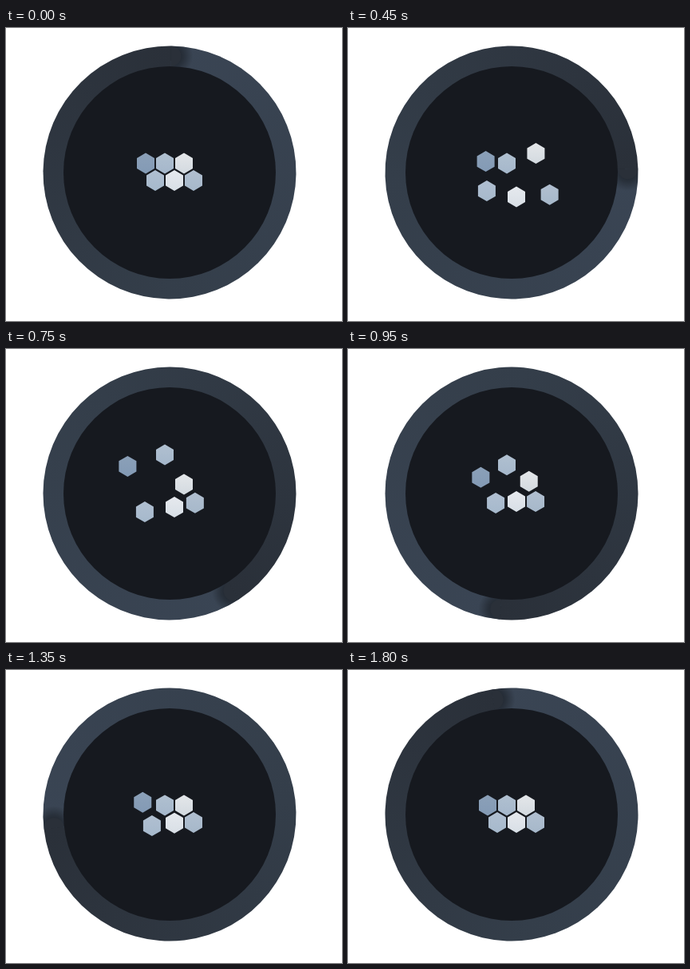
An HTML page with a canvas that plays this animation: 421 px wide and 367 px high, repeating every 1850 ms.

```html
<!DOCTYPE html>
<html lang="en">
<head>
<meta charset="utf-8">
<title>Hexagon loader</title>
<style>
html, body { margin: 0; width: 100%; height: 100%; overflow: hidden; background: #fff; }
canvas { display: block; }
</style>
</head>
<body>
<canvas id="stage" width="421" height="367"></canvas>
<script>
const ctx = document.getElementById('stage').getContext('2d');
const TAU = Math.PI * 2;
const LOOP = 1850, STEP = 50;
const CX = 205, CY = 181, OUTER = 158.5, INNER = 133;
const MID = (OUTER + INNER) / 2, HALF = (OUTER - INNER) / 2;
const DARK = '#2a3039';

// home, direction, reach, start delay, top and bottom colour
const hexes = [
  { x: 223, y: 169.5, dx: 1, dy: -1, reach: 19, delay: 0, top: '#e4e6e9', bottom: '#d3dae0' },
  { x: 235, y: 191, dx: 1, dy: 1, reach: 19.5, delay: 100, top: '#b1bfd0', bottom: '#a6b8ca' },
  { x: 211, y: 191, dx: 0, dy: 1, reach: 20.5, delay: 200, top: '#e6e9ee', bottom: '#d8dfe6' },
  { x: 187, y: 191, dx: -1, dy: 1, reach: 20, delay: 300, top: '#b0bfd1', bottom: '#a6b9cc' },
  { x: 175, y: 169.5, dx: -1, dy: -1, reach: 25, delay: 400, top: '#8ba0b8', bottom: '#839ab5' },
  { x: 199, y: 169.5, dx: 0, dy: -1, reach: 37, delay: 500, top: '#b0c0d0', bottom: '#a5b7cb' }
];

const clamp = v => Math.min(1, Math.max(0, v));
const ease = v => (1 - Math.cos(Math.PI * clamp(v))) / 2;

// A smooth hump: up from a to b, down from b to c
const hump = (t, a, b, c) => t < b ? ease((t - a) / (b - a)) : 1 - ease((t - b) / (c - b));

function offset(hex, t) {
  const local = t - hex.delay;
  return hex.reach * hump(local, 0, 250, 750) + 4.8 * hump(local, 840, 1000, 1200);
}

function disc(x, y, r, fill) {
  ctx.beginPath();
  ctx.arc(x, y, r, 0, TAU);
  ctx.fillStyle = fill;
  ctx.fill();
}

function drawRing(t) {
  ctx.save();
  ctx.translate(CX, CY);
  ctx.rotate(TAU * (t / LOOP + 0.0017));

  const sweep = ctx.createConicGradient(-Math.PI / 2, 0, 0);
  sweep.addColorStop(0, '#3a4554');
  sweep.addColorStop(0.5, '#343e4a');
  sweep.addColorStop(1, DARK);
  disc(0, 0, OUTER, sweep);

  // Leading cap and the shadow it casts ahead of itself
  ctx.save();
  ctx.beginPath();
  ctx.arc(0, 0, OUTER, 0, TAU);
  ctx.clip();
  ctx.beginPath();
  ctx.rect(0, -OUTER, 40, OUTER - INNER + 6);
  ctx.clip();
  const shade = ctx.createRadialGradient(2, -MID, HALF - 3, 2, -MID, HALF + 13);
  shade.addColorStop(0, 'rgba(30,36,44,.8)');
  shade.addColorStop(0.3, 'rgba(30,36,44,.6)');
  shade.addColorStop(1, 'rgba(30,36,44,0)');
  disc(2, -MID, HALF + 13, shade);
  disc(0, -MID, HALF, DARK);
  ctx.restore();

  ctx.restore();
  disc(CX, CY, INNER, '#16191f');
}

function drawHex(hex, t) {
  const d = offset(hex, t);
  ctx.save();
  ctx.translate(hex.x + hex.dx * d, hex.y + hex.dy * d);
  const fill = ctx.createLinearGradient(0, -13, 0, 13);
  fill.addColorStop(0, hex.top);
  fill.addColorStop(1, hex.bottom);
  ctx.beginPath();
  for (const [x, y] of [[0, -13], [11, -6.6], [11, 6.6], [0, 13], [-11, 6.6], [-11, -6.6]]) ctx.lineTo(x, y);
  ctx.closePath();
  ctx.fillStyle = fill;
  ctx.fill();
  ctx.restore();
}

function draw() {
  const t = Math.floor((performance.now() % LOOP) / STEP) * STEP;
  ctx.clearRect(0, 0, 421, 367);
  drawRing(t);
  for (const hex of hexes) drawHex(hex, t);
  requestAnimationFrame(draw);
}
draw();
</script>
</body>
</html>
```
